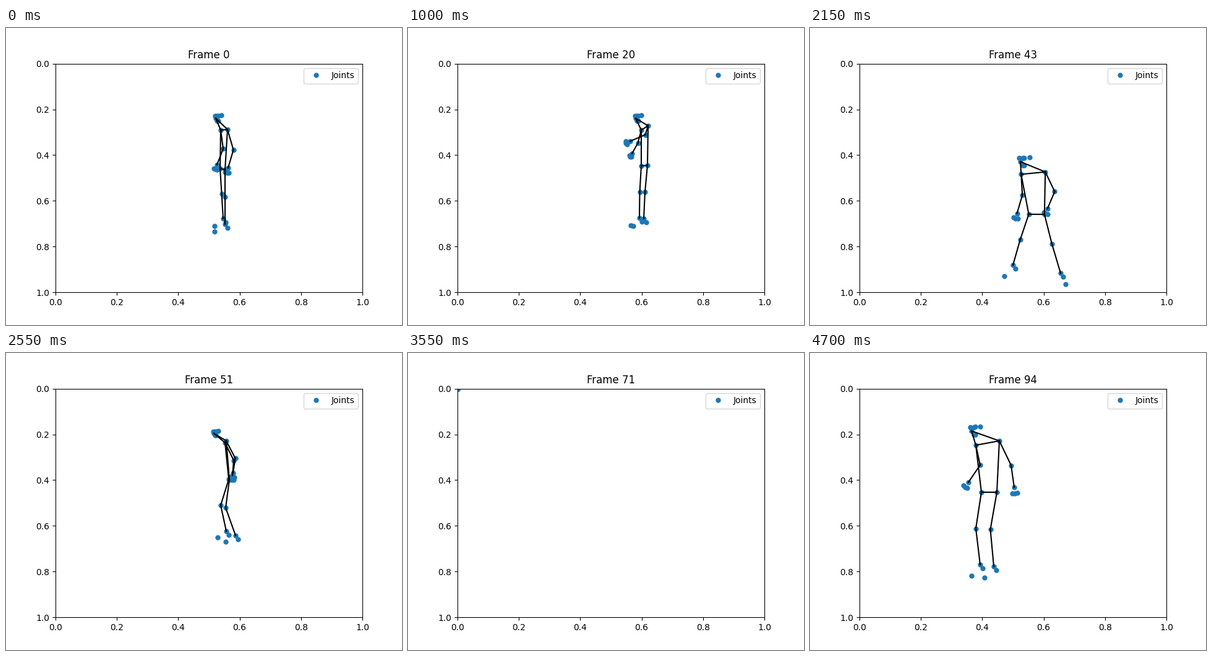
A matplotlib script for the animation above (4.75 s loop, 640 by 480 pixels).

```python
import numpy as np
import matplotlib.pyplot as plt
from matplotlib.animation import FuncAnimation

FRAMES, INTERVAL = 95, 50
W, H = 640, 480

# Body order: nose, then right/left pairs of shoulders, elbows, wrists,
# hips, knees and ankles.
BONES = [(0, 1), (0, 2), (1, 2), (1, 3), (3, 5), (2, 4), (4, 6),
         (1, 7), (2, 8), (7, 8), (7, 9), (9, 11), (8, 10), (10, 12)]


def face(nose, scale):
    """A row of eyes and ears above the nose, the mouth below it."""
    brow = [(x, -5 - x / 10) for x in (-2, 3, 5, 12)]
    mouth = [(3, 5), (5, 5)]
    return nose + scale * np.array(brow + mouth)


def hand(elbow, wrist):
    """Three fingertips fanned around the direction of the forearm."""
    along = 0.28 * (wrist - elbow)
    across = np.array([-along[1], along[0]])
    return [wrist + along * np.cos(a) + across * np.sin(a)
            for a in (-0.4, 0, 0.4)]


def pose(nose, shoulders, wrists, hips, ankles, elbow_out, knee_out):
    """All joints in stage pixels; elbows and knees bend off the limb's middle."""
    nose, shoulders, wrists, hips, ankles = map(
        np.array, (nose, shoulders, wrists, hips, ankles))
    elbows = (shoulders + wrists) / 2 + [(dx, 2) for dx in elbow_out]
    knees = (hips + ankles) / 2 + [knee_out, 0]

    # The wider the shoulders appear, the more the figure faces the viewer.
    width = shoulders[1, 0] - shoulders[0, 0]
    head = face(nose, 0.55 + width / 60)
    hands = [tip for e, w in zip(elbows, wrists) for tip in hand(e, w)]

    # A wide stance turns the left foot outwards.
    spread = ankles[1, 0] - ankles[0, 0]
    drop = 10 + width / 5
    toes = ankles + [(-14, drop), (spread ** 2 / 255 - 17, drop)]
    heels = ankles + [4, 6]
    return np.vstack([nose, shoulders, elbows, wrists, hips, knees, ankles,
                      head, hands, heels, toes])


STAND = pose((339, 146), [(347, 165), (358, 164)], [(341, 221), (359, 226)],
             [(346, 227), (354, 229)], [(351, 308), (354, 317)], (7, 9), 0)
REACH = pose((368, 146), [(377, 165), (388, 158)], [(362, 203), (359, 183)],
             [(377, 223), (387, 222)], [(374, 307), (381, 308)], (2, 10), -1)
LEAP = pose((367, 82), [(376, 100), (381, 95)], [(376, 149), (375, 141)],
            [(382, 156), (387, 154)], [(397, 247), (401, 250)], (6, 10), -9)
CROUCH = pose((336, 130), [(354, 145), (356, 142)], [(366, 198), (367, 194)],
              [(360, 204), (361, 205)], [(356, 288), (371, 295)], (8, 9), -11)
STRIDE = pose((337, 165), [(336, 186), (379, 182)], [(327, 250), (381, 242)],
              [(349, 251), (377, 251)], [(322, 333), (405, 347)], (5, 14), 0)
WALK = pose((261, 126), [(268, 149), (306, 142)], [(256, 209), (330, 217)],
            [(277, 225), (302, 225)], [(275, 342), (297, 345)], (13, 7), -8)


def blend(a, b, share, dx=0, dy=0):
    return a + share * (b - a) + [dx, dy]


KEYS = {
    0: STAND,
    8: blend(STAND, STRIDE, 0.5, -25, 7),
    14: blend(STAND, STRIDE, 0.5, 0, 34),
    20: REACH,
    27: blend(REACH, STRIDE, 0.4, 20, 30),
    35: LEAP,
    41: STRIDE + [14, 45],
    45: blend(STRIDE, CROUCH, 0.3, -6, 54),
    51: CROUCH,
    55: blend(CROUCH, STRIDE, 0.4, 10, 34),
    63: STRIDE + [90, 57],
    73: STRIDE + [150, 50],
    85: STRIDE,
    90: blend(STRIDE, WALK, 0.5, -12, 36),
    94: WALK,
}
TIMES = np.array(list(KEYS))
POSES = np.array(list(KEYS.values()))
SLOPES = np.gradient(POSES, TIMES, axis=0)

# Spans without a detected person: every joint falls back to the origin.
LOST = [range(38, 41), range(64, 73)]


def joints_at(i):
    """Cubic Hermite path through the key poses, in axes units."""
    if any(i in span for span in LOST):
        return np.zeros_like(STAND)
    k = min(np.searchsorted(TIMES, i, side="right") - 1, len(TIMES) - 2)
    span = TIMES[k + 1] - TIMES[k]
    u = (i - TIMES[k]) / span
    px = ((1 + 2 * u) * (1 - u) ** 2 * POSES[k]
          + u * (1 - u) ** 2 * span * SLOPES[k]
          + u * u * (3 - 2 * u) * POSES[k + 1]
          + u * u * (u - 1) * span * SLOPES[k + 1])
    return (px - [0.125 * W, 0.12 * H]) / [0.775 * W, 0.77 * H]


fig, ax = plt.subplots(figsize=(W / 100, H / 100), dpi=100)
ax.set_xlim(0, 1)
ax.set_ylim(1, 0)
dots, = ax.plot([], [], "o", color="tab:blue", markersize=5, label="Joints")
bones = [ax.plot([], [], color="black")[0] for _ in BONES]
title = ax.set_title("Frame 0")
ax.legend(loc="upper right")


def update(i):
    joints = joints_at(i)
    dots.set_data(*joints.T)
    for line, (a, b) in zip(bones, BONES):
        line.set_data(*joints[[a, b]].T)
    title.set_text(f"Frame {i}")
    return [dots, *bones, title]


anim = FuncAnimation(fig, update, frames=FRAMES, interval=INTERVAL,
                     repeat=True, repeat_delay=0)
plt.show()
```
